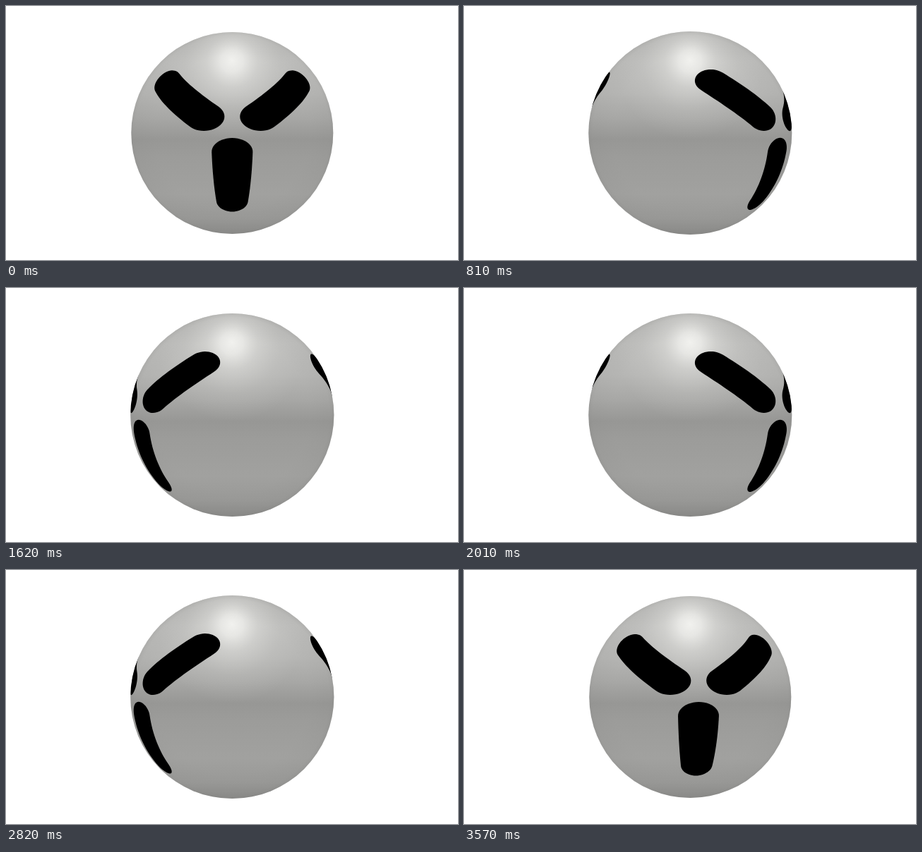
These frames come from a looping animation (640 px wide and 360 px high, 3.6 s). An HTML page with a canvas:

```html
<!DOCTYPE html>
<html lang="en">
<head>
<meta charset="utf-8">
<title>Spinning mask ball</title>
<style>
  html, body { margin: 0; width: 100%; height: 100%; overflow: hidden; background: #fff; }
  canvas { display: block; }
</style>
</head>
<body>
<canvas id="stage" width="640" height="360"></canvas>
<script>
const ctx = document.getElementById('stage').getContext('2d');
const CX = 320.3, CY = 180, RADIUS = 144, CAMERA = 14;
const HALF_TURN = 1200, STEP = 30;
const CAP = 11, SQUASH = 0.68; // blob cap: degrees of longitude, latitude ratio
const rad = deg => deg * Math.PI / 180;

// Rounded bars between two [longitude, latitude] points, in degrees.
const face = [
  [[15.1, 8.6], [44.7, 28.7]],
  [[-15.1, 8.6], [-44.7, 28.7]],
  [[0, -10.1], [0, -40]],
].map(([a, b]) => barOutline(a, b));

function barOutline(a, b) {
  const points = [];
  const addHalf = (from, to) => {
    const dir = Math.atan2((to[1] - from[1]) / SQUASH, to[0] - from[0]);
    for (let i = 0; i < 40; i++) {
      const turn = dir + Math.PI * (0.5 + Math.min(i / 24, 1));
      const along = Math.max(0, (i - 24) / 16);
      points.push([
        from[0] + (to[0] - from[0]) * along + CAP * Math.cos(turn),
        from[1] + (to[1] - from[1]) * along + CAP * SQUASH * Math.sin(turn),
      ]);
    }
  };
  addHalf(a, b);
  addHalf(b, a);
  return points;
}

function gradient(shape, stops) {
  for (const [at, color] of stops) shape.addColorStop(at, color);
  return shape;
}

const body = gradient(ctx.createLinearGradient(0, 36, 0, 324), [
  [0, '#b4b4b2'], [0.15, '#bdbdbb'], [0.3, '#b6b6b4'], [0.42, '#a8a8a6'],
  [0.53, '#979795'], [0.62, '#9c9c9a'], [0.8, '#a1a19f'], [0.92, '#999997'], [1, '#8a8a88'],
]);
const shine = gradient(ctx.createRadialGradient(320, 77, 0, 320, 84, 105), [
  [0, 'rgba(244,244,241,.95)'], [0.15, 'rgba(240,240,237,.82)'],
  [0.35, 'rgba(226,226,223,.5)'], [0.65, 'rgba(212,212,209,.2)'], [1, 'rgba(205,205,203,0)'],
]);
const rimShade = gradient(ctx.createRadialGradient(CX, CY, 110, CX, CY, 145), [
  [0, 'rgba(120,120,118,0)'], [0.8, 'rgba(120,120,118,.06)'], [1, 'rgba(120,120,118,.2)'],
]);

function project([lon, lat], spin) {
  const x = Math.cos(rad(lat)) * Math.sin(rad(lon + spin));
  const y = Math.sin(rad(lat));
  const z = Math.cos(rad(lat)) * Math.cos(rad(lon + spin));
  const visible = z > 1 / CAMERA;
  // Hidden points slide out to the limb, so a bar is cut off by the horizon.
  const scale = RADIUS * (visible ? CAMERA / (CAMERA - z) : 1.003 / Math.hypot(x, y));
  return { x: CX + x * scale, y: CY - y * scale, visible };
}

function drawBar(outline, spin) {
  const points = outline.map(p => project(p, spin));
  if (!points.some(p => p.visible)) return;
  ctx.beginPath();
  for (const p of points) ctx.lineTo(p.x, p.y);
  ctx.fillStyle = '#000';
  ctx.fill();
}

function draw(now) {
  const time = Math.floor(now / STEP) * STEP % HALF_TURN;
  const spin = -180 * time / HALF_TURN;
  const rim = 144.4 - 1.4 * Math.cos(rad(spin)) ** 2;

  ctx.fillStyle = '#fff';
  ctx.fillRect(0, 0, 640, 360);
  ctx.save();
  ctx.beginPath();
  ctx.arc(CX, CY, rim, 0, 2 * Math.PI);
  ctx.clip();
  for (const paint of [body, shine, rimShade]) {
    ctx.fillStyle = paint;
    ctx.fillRect(0, 0, 640, 360);
  }
  for (const side of [0, 180]) {
    for (const outline of face) drawBar(outline, spin + side);
  }
  ctx.restore();
}

function frame() {
  draw(performance.now());
  requestAnimationFrame(frame);
}
frame();
</script>
</body>
</html>
```
